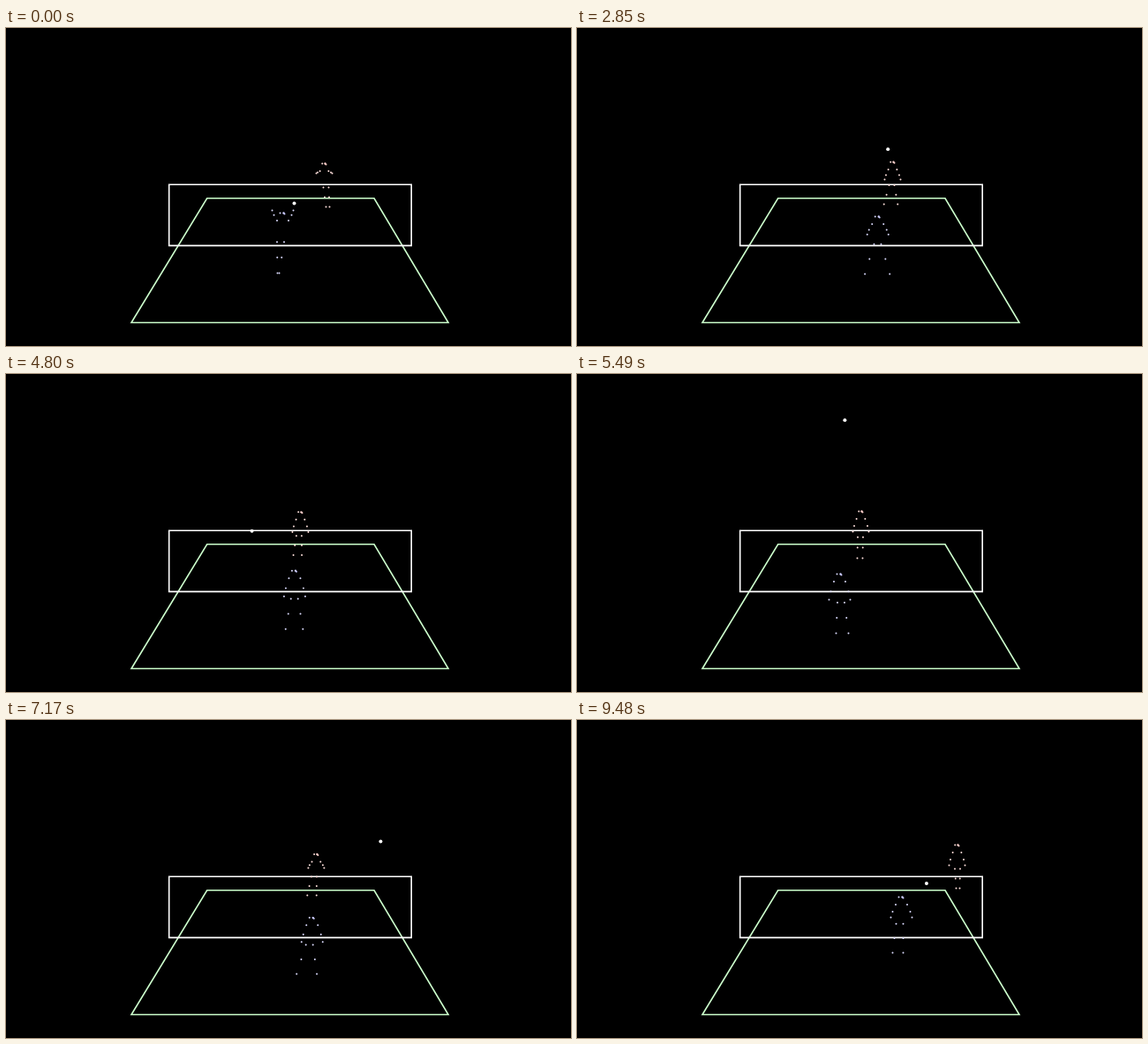
Write an HTML page with a canvas that moves like this. It is 640 px wide and 360 px high and loops after 9510 ms.

```html
<!DOCTYPE html>
<html lang="en">
<head>
<meta charset="utf-8">
<title>Court rally</title>
<style>
html, body { margin: 0; width: 100%; height: 100%; overflow: hidden; background: #000; }
canvas { display: block; }
</style>
</head>
<body>
<canvas id="stage" width="640" height="360"></canvas>
<script>
const ctx = document.getElementById('stage').getContext('2d');
const LOOP = 9510, STEP = 30;

// Stances: time, head x, head y, foot x, foot y, stride, wrist drop below the head.
const far = {
  size: 0.75, hip: 0.55, color: '#ffe0dc', headColor: '#ffd0cc',
  stances: [
    [0, 360, 153, 364, 202, 2, 11], [1560, 367, 144, 370, 198, 2, 17],
    [3960, 349, 157, 343, 200, 12, 22], [5490, 321, 155, 320, 208, 3, 23],
    [6300, 316, 154, 306, 195, 2, 16], [8010, 384, 149, 384, 201, 14, 15],
    [9480, 430, 141, 431, 190, 2, 23]
  ]
};
const near = {
  size: 1, hip: 0.48, color: '#dcdcff', headColor: '#ccccff',
  stances: [
    [0, 313, 209, 308, 277, 1, -3], [1560, 308, 208, 313, 273, 6, 9],
    [3960, 366, 217, 361, 282, 20, 29], [5490, 297, 226, 300, 293, 7, 29],
    [6300, 316, 229, 315, 287, 20, 28], [8010, 375, 218, 364, 287, 11, 27],
    [9480, 367, 200, 363, 263, 6, 23]
  ]
};

// Hits: time, x, y, and the rise of the arc that follows.
const hits = [
  [0, 326, 198, 5], [930, 363, 162, 190], [2550, 340, 207, 90],
  [3960, 395, 160, 20], [4980, 253, 195, 178], [6810, 432, 195, 50],
  [8010, 405, 142, 25], [8670, 380, 205, 30], [LOOP, 396, 188, 0]
];

const mix = (a, b, u) => a + (b - a) * u;
const smooth = u => u * u * (3 - 2 * u);

function spanAt(keys, t) {
  let i = 0;
  while (i < keys.length - 2 && keys[i + 1][0] <= t) i++;
  const a = keys[i], b = keys[i + 1];
  return [a, b, (t - a[0]) / (b[0] - a[0])];
}

function dot(x, y, r, color) {
  ctx.fillStyle = color;
  ctx.beginPath();
  ctx.arc(x + 0.5, y + 0.5, r, 0, 2 * Math.PI);
  ctx.fill();
}

function outline(color, points) {
  ctx.strokeStyle = color;
  ctx.lineWidth = 1.6;
  ctx.beginPath();
  for (const [x, y] of points) ctx.lineTo(x, y);
  ctx.closePath();
  ctx.stroke();
}

function drawPlayer({ size, hip, color, headColor, stances }, t) {
  const [a, b, u] = spanAt(stances, t);
  const [, headX, headY, footX, footY, stride, drop] =
    a.map((v, i) => mix(v, b[i], smooth(u)));
  const step = stride + 4 * size * Math.sin(Math.PI * u) * Math.sin(t / 130);
  const hipX = mix(headX, footX, 0.5), hipY = mix(headY, footY, hip);
  const kneeX = mix(hipX, footX, 0.5), kneeY = mix(hipY, footY, 0.5);
  const shoulderY = headY + 8.5;
  const pair = (x, y, spread) => {
    dot(x - spread, y, 1, color);
    dot(x + spread, y, 1, color);
  };

  dot(headX - 3 * size, headY, 1, color);
  dot(headX + 1, headY, 1.2, headColor);
  dot(headX + 2, headY + 1, 1, headColor);
  pair(headX, shoulderY, 6.5 * size);
  pair(headX, mix(shoulderY, headY + drop, 0.55), 10 * size);
  pair(headX, headY + drop, 12 * size);
  pair(hipX, hipY, 4 * size);
  pair(kneeX, kneeY, (4 * size + step) / 2);
  pair(footX, footY, step);
}

function drawBall(t) {
  const [a, b, u] = spanAt(hits, t);
  const y = mix(a[2], b[2], u) - a[3] * 4 * u * (1 - u);
  dot(mix(a[1], b[1], u), Math.max(y, 7), 2, '#fff');
}

function draw(time) {
  const t = Math.floor(time % LOOP / STEP) * STEP;
  ctx.fillStyle = '#000';
  ctx.fillRect(0, 0, 640, 360);
  outline('#ccffcc', [[227.7, 192.8], [417, 192.8], [501, 333.5], [142, 333.5]]);
  outline('#fff', [[184.7, 177.2], [459.2, 177.2], [459.2, 246.4], [184.7, 246.4]]);
  drawPlayer(far, t);
  drawPlayer(near, t);
  drawBall(t);
}

const start = performance.now();
function tick() {
  draw(performance.now() - start);
  requestAnimationFrame(tick);
}
tick();
</script>
</body>
</html>
```
